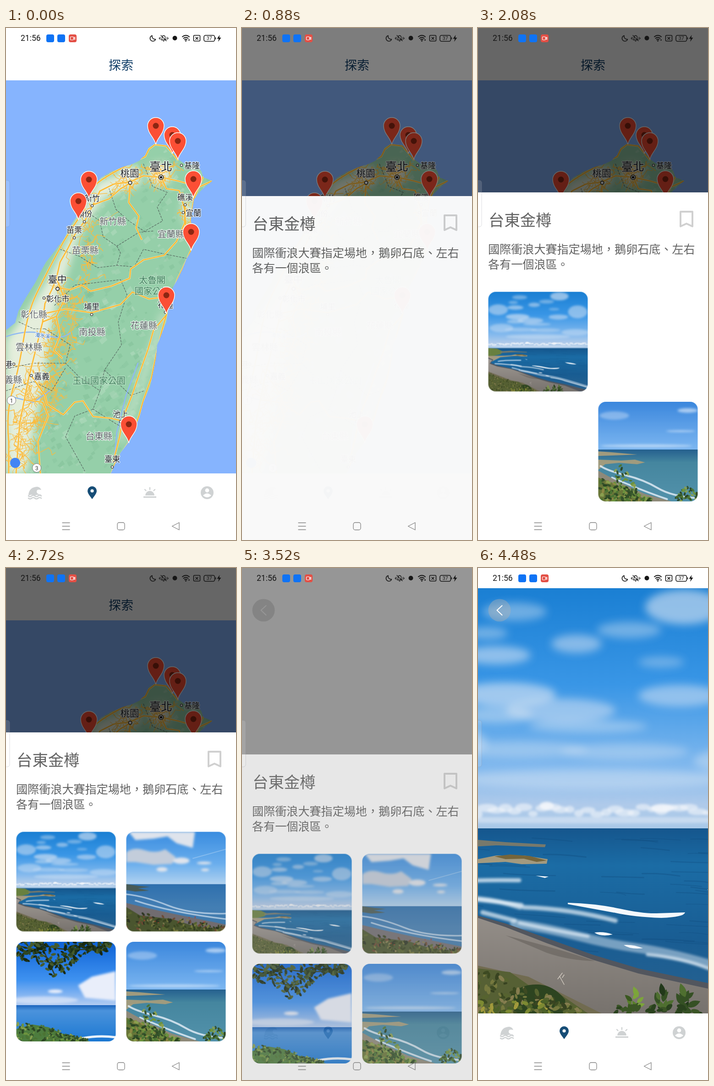
An HTML page for the animation above (4560 ms loop, 502x1115 px).

```html
<!DOCTYPE html>
<html lang="zh-Hant">
<head>
<meta charset="utf-8">
<title>探索</title>
<style>
html, body { margin: 0; width: 100%; height: 100%; overflow: hidden; background: #fff; }
svg { display: block; }
text { font-family: "Noto Sans CJK TC", "Noto Sans CJK", sans-serif; }
.latin { font-family: Roboto, sans-serif; }
.label { text-anchor: middle; paint-order: stroke; stroke: #fffc; stroke-width: 2.6px; stroke-linejoin: round; }
.town { fill: #20242a; font-weight: 500; }
.county { fill: #5c6266; }
.park { fill: #43805f; stroke: #d3ecdb99; }
.line { fill: none; stroke-linecap: round; stroke-linejoin: round; }
.road { stroke: #fbb62e; stroke-width: 2.2; }
.casing { stroke: #fde6a4; stroke-width: 3.6; }
.border { stroke: #52625c; stroke-width: 1.1; stroke-dasharray: 4 3; }
.foam { stroke: #e9f2fa; }

.anim { animation: 4560ms step-end infinite; }
#detail { animation-name: page; }
#hero { animation-name: hero; }
#dim { animation-name: dim; }
#sheet { animation-name: sheet; }
#p1 { animation-name: load1; }
#p2 { animation-name: load2; }
#p3 { animation-name: load3; }
#p4 { animation-name: load4; }
@keyframes page { 0% { opacity: 0 } 75.43%, 100% { opacity: 1 } }
@keyframes hero { 0% { opacity: 0 } 82.45%, 100% { opacity: 1 } }
@keyframes dim {
  0% { opacity: 0 } 15.78% { opacity: .12 } 17.53% { opacity: .34 } 19.29% { opacity: .51 } 21.05% { opacity: .6 }
  75.43% { opacity: .54 } 77.19% { opacity: .41 } 78.94% { opacity: .22 } 80.7% { opacity: .06 } 82.45%, 100% { opacity: 0 }
}
@keyframes sheet {
  0% { opacity: 0; transform: translateY(205px) }
  15.78% { opacity: .5; transform: translateY(102px) }
  17.53% { opacity: .8; transform: translateY(40px) }
  19.29% { opacity: .96; transform: translateY(8px) }
  21.05% { opacity: 1; transform: none }
  75.43% { opacity: .94; transform: translateY(12px) }
  77.19% { opacity: .77; transform: translateY(48px) }
  78.94% { opacity: .43; transform: translateY(117px) }
  80.7% { opacity: .1; transform: translateY(184px) }
  82.45%, 100% { opacity: 0; transform: translateY(205px) }
}
@keyframes load1 { 0% { opacity: 0 } 36.84%, 100% { opacity: 1 } }
@keyframes load4 { 0% { opacity: 0 } 40.35%, 100% { opacity: 1 } }
@keyframes load2 { 0% { opacity: 0 } 49.12% { opacity: .35 } 50.87% { opacity: .7 } 52.63%, 100% { opacity: 1 } }
@keyframes load3 { 0% { opacity: 0 } 59.64%, 100% { opacity: 1 } }
</style>
</head>
<body>
<svg width="502" height="1115" viewBox="0 0 502 1115">
<defs>
  <filter id="soft" x="-50%" y="-50%" width="200%" height="200%"><feGaussianBlur stdDeviation="9"/></filter>
  <filter id="haze" x="-50%" y="-50%" width="200%" height="200%"><feGaussianBlur stdDeviation="2.5"/></filter>
  <path id="coast" d="M0,658 L20,642 27,616 44,586 64,554 78,526 87,510 106,486 126,460 140,432 152,414 166,398 174,382 182,363 192,344 207,326 232,312 252,304 274,297 291,289 304,276 311,260 325,252 350,255 361,268 375,285 390,296 414,298 426,311 431,325 450,333 434,346 420,360 410,373 407,392 403,420 408,440 418,455 412,470 404,486 394,502 385,525 375,545 362,570 358,590 353,620 350,640 340,665 330,690 327,718 322,745 315,780 300,815 292,845 280,875 265,905 250,925 240,945 228,971 0,971Z"/>
  <clipPath id="land"><use href="#coast"/></clipPath>
  <clipPath id="tile"><rect width="217" height="217" rx="16"/></clipPath>
  <g id="pin">
    <path d="M0,0 C-2,-14 -18,-24 -18,-41 a18,18 0 0 1 36,0 C18,-24 2,-14 0,0Z" fill="#fb4f35" stroke="#fff" stroke-width="1.4"/>
    <circle cy="-41" r="6.5" fill="#8b2612"/>
  </g>
  <linearGradient id="sky1" x2="0" y2="1"><stop stop-color="#1a7fd3"/><stop offset=".4" stop-color="#3996e6"/><stop offset=".75" stop-color="#82b9ee"/><stop offset=".9" stop-color="#afcaea"/><stop offset="1" stop-color="#a9c9e8"/></linearGradient>
  <linearGradient id="sea1" x2="0" y2="1"><stop stop-color="#15568d"/><stop offset=".2" stop-color="#1b6ca5"/><stop offset=".6" stop-color="#195d93"/><stop offset="1" stop-color="#2a628f"/></linearGradient>
  <linearGradient id="sand1" x2="0" y2="1"><stop stop-color="#a09a94"/><stop offset="1" stop-color="#77726d"/></linearGradient>
  <linearGradient id="sky2" x2="0" y2="1"><stop stop-color="#3a8de0"/><stop offset=".6" stop-color="#6aaeed"/><stop offset="1" stop-color="#b3d3f0"/></linearGradient>
  <linearGradient id="sea2" x2="0" y2="1"><stop stop-color="#2f70ae"/><stop offset=".5" stop-color="#447fb4"/><stop offset="1" stop-color="#3d76a5"/></linearGradient>
  <linearGradient id="sky3" x2="0" y2="1"><stop stop-color="#0e62d6"/><stop offset=".6" stop-color="#3f92f0"/><stop offset="1" stop-color="#b5cdf2"/></linearGradient>
  <linearGradient id="sea3" x2="0" y2="1"><stop stop-color="#1b64bd"/><stop offset=".15" stop-color="#4b93dc"/><stop offset="1" stop-color="#1c78d2"/></linearGradient>
  <linearGradient id="sky4" x2="0" y2="1"><stop stop-color="#3b87dd"/><stop offset="1" stop-color="#7db7f1"/></linearGradient>
  <linearGradient id="sea4" x2="0" y2="1"><stop stop-color="#25608f"/><stop offset=".25" stop-color="#45869f"/><stop offset="1" stop-color="#5392ab"/></linearGradient>

  <symbol id="bay" viewBox="-212 44 926 926">
    <rect x="-212" y="44" width="926" height="524" fill="url(#sky1)"/>
    <g id="clouds" fill="#dfe8f4" filter="url(#soft)"/>
    <g id="cumulus" fill="#f2f5fa" filter="url(#haze)"/>
    <rect x="-212" y="567" width="926" height="403" fill="url(#sea1)"/>
    <g id="ripples" class="line" stroke="#0f4878"/>
    <path d="M-212,567 L-130,572 -95,590 -70,600 -100,625 -212,650Z" fill="#68803f"/>
    <path d="M-100,598 L0,592 60,597 148,602 146,608 40,604 -100,612Z" fill="#77796c"/>
    <path d="M-212,640 L-60,638 0,634 40,626 100,626 152,634 150,644 95,645 60,640 0,643 -100,652 -175,690 -212,700Z" fill="#a39a7f"/>
    <path d="M36,628 L70,624 112,627 150,637 128,640 100,633 60,634Z" fill="#75653b"/>
    <g class="line foam" filter="url(#haze)">
      <path d="M-120,690 Q-60,678 90,680 M-150,712 Q-40,715 95,734" stroke-width="9" opacity=".75"/>
      <path d="M0,720 Q45,724 92,739 M100,739 Q200,742 300,768 M10,750 L80,768" stroke-width="10" opacity=".7"/>
      <path d="M80,774 Q150,784 220,802 T350,828 T502,862 T714,925" stroke-width="20" opacity=".45"/>
      <path d="M90,773 Q180,792 240,802 M370,842 Q450,850 502,872 L714,932" stroke-width="7" opacity=".7"/>
    </g>
    <path d="M196,729 Q260,731 310,742 T390,752 L452,750 Q450,760 400,762 Q340,760 300,751 Q250,742 196,732Z M126,670 l28,2 -8,3Z M254,794 q20,-3 40,4 q-25,6 -40,-4Z M318,821 q20,-2 42,7 q-28,3 -42,-7Z M500,700 q60,0 110,18 q-60,4 -110,-18Z" fill="#f4f8fc"/>
    <path d="M-212,655 L-165,675 -190,705 -130,728 0,757 60,774 150,806 250,842 350,872 502,904 714,958 714,970 -212,970Z" fill="#52565e"/>
    <path d="M-212,665 L-175,680 -200,712 -130,738 0,762 60,782 150,817 250,853 350,883 502,916 640,970 -212,970Z" fill="url(#sand1)"/>
    <path d="M60,800 Q180,830 255,856 Q200,855 150,838Z" fill="#66615d" opacity=".6"/>
    <path d="M174,895 l10,-13 M178,889 l10,18 M184,892 l4,-6" class="line" stroke="#cfc8be" stroke-width="1.5"/>
    <path d="M-212,785 L-100,828 0,866 110,890 190,930 270,970 -212,970Z" fill="#716b50"/>
    <path d="M-212,800 L-100,845 0,872 70,880 110,908 160,915 240,970 -212,970Z" fill="#566034"/>
    <path d="M72,928 Q95,906 130,907 T190,940 L192,970 H80Z" fill="#2d4420"/>
    <g id="scrub"/>
    <g id="sprigs"/>
  </symbol>
</defs>

<g id="explore">
  <rect width="502" height="1115" fill="#fff"/>
  <text x="251" y="81" dy=".38em" font-size="27" text-anchor="middle" fill="#123f68">探索</text>
  <rect y="114" width="502" height="856" fill="#86b4fe"/>
  <svg width="502" height="970">
  <g clip-path="url(#land)">
    <use href="#coast" fill="#95cfa9"/>
    <g id="relief"/>
    <g filter="url(#soft)">
      <path d="M200,335 Q150,430 110,510 T20,650 L0,680 V970 H45 Q65,850 88,740 Q98,640 120,570 T165,440 L215,370 300,335 270,310Z" fill="#e5eedc"/>
      <circle cx="336" cy="318" r="24" fill="#f3ecd8"/><circle cx="268" cy="325" r="25" fill="#e6eddc"/>
      <ellipse cx="396" cy="400" rx="12" ry="26" fill="#e4ecda"/><path d="M345,620 L300,760 250,900" stroke="#c8e3ca" stroke-width="12"/>
    </g>
    <g id="lanes" class="line" stroke="#fbbb3d"/>
    <path class="line" d="M0,672 Q50,655 85,668 T140,664 M20,805 L60,815 95,790 M288,730 L262,800 242,880 236,940" stroke="#8fb9f3" stroke-width="2.5"/>
    <g class="line border">
      <path d="M300,296 L320,345 352,358 330,390 342,420 302,443 268,420 240,395 225,350"/>
      <path d="M183,405 L205,420 212,455 242,475 290,445 322,442 M118,482 L160,497 200,522 242,517 250,490 242,475"/>
      <path d="M242,517 L280,520 300,482 345,492 396,502 M106,604 L150,560 250,548 264,580 245,640 252,690 215,745 205,790"/>
      <path d="M85,655 L140,690 130,730 160,760 205,790 190,830 240,862 275,880 M0,790 L60,770 100,790 130,740"/>
      <path d="M190,830 L150,845 130,890 172,965 M215,745 L272,800 302,790 M28,640 L60,655 85,655 M0,742 L60,730 130,730"/>
    </g>
    <g id="roads"></g>
  </g>
  <g id="labels"></g>
  <text class="label" x="80" y="670" dy=".38em" font-size="11" fill="#2f6fc4" transform="rotate(6 80 670)">濁水溪</text>
  <g fill="#fff" stroke="#777" class="latin"><circle cx="12" cy="811" r="9.5"/><circle cx="67" cy="958" r="9.5"/></g>
  <g font-size="12" text-anchor="middle" fill="#333"><text class="latin" x="12" y="815.5">1</text><text class="latin" x="67" y="962.5">3</text></g>
  <circle cx="20" cy="947" r="11" fill="#4285f4"/>
  <g id="pins"></g>
  </svg>
  <g id="tabs">
    <g fill="#cfd2d3">
      <path d="M49,1016 Q51,1000 68,999 Q75,1000 77,1006 Q66,1003 67,1011 Q69,1016 77,1016 L76,1018 Q70,1015 63,1018 Q56,1015 49,1018Z"/>
      <path class="line" d="M49,1019 q3.5,3 7,0 t7,0 t7,0 t7,0 M49,1024 q3.5,3 7,0 t7,0 t7,0 t7,0" stroke="#cfd2d3" stroke-width="2.6" style="fill:none"/>
      <path d="M304,1018 a10,10 0 0 1 20,0Z M300,1020 h28 v3 h-28Z"/>
      <path class="line" d="M314,1001 v4 M303,1005 l2.5,2.5 M325,1005 l-2.5,2.5" stroke="#cfd2d3" stroke-width="2.4"/>
      <circle cx="439" cy="1012" r="14"/>
    </g>
    <circle cx="439" cy="1007" r="4.4" fill="#fff"/><path d="M430,1018 q9,-9 18,0 q-9,8 -18,0Z" fill="#fff"/>
    <path d="M188,1026 C184,1020 178,1014 178,1008 a10,10 0 0 1 20,0 C198,1014 192,1020 188,1026Z" fill="#164d76"/><circle cx="188" cy="1008" r="3.6" fill="#fff"/>
  </g>
</g>

<g id="detail" class="anim">
  <rect width="502" height="1115" fill="#fff"/>
  <g id="hero" class="anim"><use href="#bay" x="-212" y="44" width="926" height="926"/></g>
  <circle cx="47" cy="92" r="24.5" fill="#b2b2b2" opacity=".4"/>
  <path class="line" d="M52.5,82 L41.5,92 52.5,102.5" stroke="#fff" stroke-width="2"/>
  <use href="#tabs"/>
</g>

<rect id="dim" class="anim" width="502" height="1115"/>

<g id="sheet" class="anim">
  <rect y="358" width="502" height="760" fill="#fff"/>
  <g fill="#626262">
    <text x="23" y="418" dy=".38em" font-size="34.4">台東金樽</text>
    <g font-size="25.1"><text x="22" y="481" dy=".38em">國際衝浪大賽指定場地，鵝卵石底、左右</text><text x="22" y="514" dy=".38em">各有一個浪區。</text></g>
  </g>
  <path d="M442,400 h26 v32 l-13,-6 -13,6Z" fill="none" stroke="#d0d0d0" stroke-width="4" stroke-linejoin="round"/>
  <g transform="translate(22.5 574.5)"><g id="p1" class="anim" clip-path="url(#tile)"><use href="#bay" width="217" height="217"/></g></g>
  <g transform="translate(262.5 574.5)"><g id="p2" class="anim" clip-path="url(#tile)">
    <rect width="217" height="115" fill="url(#sky2)"/>
    <g filter="url(#haze)" fill="#dfe4ec">
      <path d="M5,0 H150 L145,35 110,25 90,10 60,15 20,18Z"/><path d="M0,45 Q15,32 40,40 T85,38 L108,55 100,70 60,72 20,66 0,66Z" fill="#c3cddb"/>
      <ellipse cx="120" cy="63" rx="18" ry="7"/><ellipse cx="78" cy="82" rx="12" ry="5"/><ellipse cx="170" cy="68" rx="16" ry="3"/><ellipse cx="172" cy="83" rx="9" ry="3"/>
    </g>
    <path class="line" d="M145,58 L217,38" stroke="#e6f0fa" opacity=".6"/>
    <rect y="114" width="217" height="103" fill="url(#sea2)"/>
    <path d="M0,114 L28,118 52,120 25,123 50,128 20,130 0,127Z" fill="#485a55"/>
    <path class="line foam" d="M0,136 Q40,140 90,160 T217,178 M20,150 Q100,176 217,190" stroke-width="3" opacity=".65"/>
    <path d="M0,155 L50,167 110,180 217,202 V217 H0Z" fill="#716c70"/>
    <path d="M0,164 L30,182 100,190 150,206 217,212 V217 H0Z" fill="#4a552f"/>
    <g id="brush2"/>
  </g></g>
  <g transform="translate(22.5 814)"><g id="p3" class="anim" clip-path="url(#tile)">
    <rect width="217" height="139" fill="url(#sky3)"/>
    <g filter="url(#haze)" fill="#e9eefa"><path d="M135,95 L165,76 217,64 V128 L150,122Z"/><ellipse cx="85" cy="108" rx="16" ry="4"/><ellipse cx="60" cy="127" rx="75" ry="8" opacity=".6"/></g>
    <rect y="138" width="217" height="79" fill="url(#sea3)"/>
    <path class="line foam" d="M145,210 Q180,203 217,208" stroke-width="5"/>
    <path class="line" d="M0,8 Q60,18 100,65 M40,0 Q110,30 205,8 M60,20 L85,75" stroke="#2e3a22" stroke-width="2.5"/>
    <path d="M0,217 V190 L35,180 70,186 100,200 150,212 160,217Z" fill="#4d7c3e"/>
    <g id="canopy"/><g id="brush3"/>
  </g></g>
  <g transform="translate(262.5 814)"><g id="p4" class="anim" clip-path="url(#tile)">
    <rect width="217" height="105" fill="url(#sky4)"/>
    <g filter="url(#haze)" fill="#dceafa" opacity=".65"><ellipse cx="35" cy="30" rx="32" ry="9" opacity=".6"/><ellipse cx="195" cy="19" rx="22" ry="5"/><ellipse cx="180" cy="64" rx="32" ry="2"/><ellipse cx="105" cy="96" rx="100" ry="3"/></g>
    <rect y="104" width="217" height="113" fill="url(#sea4)"/>
    <path d="M0,108 L30,110 85,115 30,117 0,118Z M0,126 L50,128 80,126 102,132 85,136 45,133 15,136 0,148Z" fill="#a09b7e"/>
    <path class="line foam" d="M5,140 Q20,150 60,160 T130,188 T217,210 M30,165 Q100,195 150,212" stroke-width="4" opacity=".8"/>
    <path d="M0,150 L40,172 100,200 160,217 H0Z" fill="#8e8979"/>
    <path d="M0,165 L30,176 70,195 110,217 H0Z" fill="#687638"/>
    <g id="brush4"/>
  </g></g>
</g>

<g id="system">
  <text class="latin" x="32" y="28.2" font-size="17.5" fill="#161616">21:56</text>
  <rect x="88" y="14" width="17" height="17" rx="4" fill="#0f73f5"/><rect x="112" y="14" width="17" height="17" rx="4" fill="#0f73f5"/><rect x="137" y="14" width="17" height="17" rx="4" fill="#e34f45"/>
  <g class="line" stroke="#fff" stroke-width="1.2"><rect x="140.500" y="19" width="7" height="7" rx="1.500"/><path d="M147.500,22 l3,-2 v5 l-3,-2"/></g>
  <g class="line" stroke="#161616" stroke-width="1.6">
    <path d="M319,16.500 a6.200,6.200 0 1 0 7.500,8 a6.500,6.500 0 0 1 -7.500,-8Z"/>
    <path d="M339,26 h10 l-1.500,-3 v-3 a3.500,3.500 0 0 0 -7,0 v3Z M343,28.500 h2 M338,16 l12,12 M336.500,20 v5 M334.500,21.500 v2 M351.500,20 v5 M354,21.500 v2" stroke-width="1.3"/>
    <path d="M385,19 q7.500,-6 15,0 M387.500,22.500 q5,-4 10,0 M390,25.500 q2.500,-2 5,0" stroke-width="2"/>
    <rect x="409.500" y="16" width="14" height="12.500" rx="2"/><path d="M414,20 l5,5 m0,-5 l-5,5"/>
    <rect x="432" y="16" width="23.500" height="13" rx="3.500"/><path d="M457.500,21 v3"/>
  </g>
  <circle cx="368.500" cy="22" r="5" fill="#161616"/><circle cx="392.500" cy="28" r="1.500" fill="#161616"/>
  <circle cx="399.500" cy="26" r="1.500" fill="#161616"/>
  <text class="latin" x="443.700" y="26.300" font-size="10.500" text-anchor="middle" fill="#161616">37</text>
  <path d="M466.500,15 l-6,8.500 h4 l-1.500,6.500 6.500,-9 h-4Z" fill="#161616"/>
  <g class="line" stroke="#858585" stroke-width="1.3">
    <path d="M123,1077.500 h16 M123,1085 h16 M123,1092.500 h16 M362.500,1085 L378,1077 V1093Z"/><rect x="243" y="1077" width="16" height="16" rx="4"/>
  </g>
  <rect x="-10" y="332" width="18" height="101" rx="5" fill="#fff" fill-opacity=".14" stroke="#8a8f98" stroke-opacity=".3"/>
</g>
</svg>

<script>
let seed = 7;
const rnd = (a = 0, b = 1) => {
  seed = (seed * 16807) % 2147483647;
  return a + (b - a) * seed / 2147483647;
};
const pick = list => list[Math.floor(rnd(0, list.length))];
const put = (id, html) => document.getElementById(id).insertAdjacentHTML('beforeend', html);
const many = (n, make) => Array.from({ length: n }, (_, i) => make(i)).join('');
const f = v => v.toFixed(1);

// Map relief: small shaded facets over the mountains
put('relief', many(420, () => {
  const y = rnd(270, 970), mid = 350 - (y - 270) * .27, x = mid + rnd(-130, 120), s = rnd(4, 13);
  return `<path d="M${f(x)},${f(y)} l${f(s)},${f(-s * rnd(.3, 1.2))} ${f(s * .5)},${f(s * .8)} ${f(-s)},${f(s * rnd(.3, .9))}Z" fill="${pick(['#b3dcbf', '#a8d6b6', '#84c19a', '#8ac7a0'])}" opacity=".55"/>`;
}));

// Minor roads: short grid-like walks
const walk = (x, y, steps, size) => {
  let d = `M${f(x)},${f(y)}`, angle = rnd(0, 6.3);
  for (let i = 0; i < steps; i++) {
    const a = angle + pick([0, 0, 1.4, -1.4]) + rnd(-.35, .35);
    d += ` l${f(Math.cos(a) * size)},${f(Math.sin(a) * size)}`;
  }
  return `<path d="${d}" stroke-width="${f(rnd(.7, 1.5))}"/>`;
};
put('lanes', many(190, () => {
  const t = Math.sqrt(rnd());
  return walk(215 - 180 * t + rnd(-28, 28) * (.5 + t), 345 + 600 * t, 7, 9);
}) + many(34, () => walk(338 + rnd(-22, 22), 316 + rnd(-18, 18), 6, 6))
   + many(24, () => walk(262 + rnd(-40, 35), 325 + rnd(-16, 18), 6, 8))
   + many(10, () => walk(396 + rnd(-8, 8), 402 + rnd(-24, 24), 5, 7)));

const roads = [
  'M450,333 L424,345 400,340 375,333 339,325 300,322 271,335 235,340 205,355 190,385 172,420 150,450 135,480 118,510 110,545 100,570 85,600 80,640 70,680 60,720 50,760 40,810 30,860 22,970',
  'M375,287 L361,270 350,257 325,254 312,264 304,280 Q250,304 210,330 T172,397 Q140,437 112,490 T66,580 T38,680 T14,790 T6,900 V970',
  'M430,325 L410,372 403,420 413,455 404,483 385,525 375,545 358,590 350,625 340,660 328,710 318,760 300,810 290,845 268,902 240,943 230,970',
  'M350,625 L322,658 310,700 292,750 275,800 255,850 248,890 234,945',
  'M110,565 L140,570 165,560 185,573 230,562 270,545 272,525 300,505 345,495 372,465 390,425 391,385',
  'M83,622 L130,612 187,620 250,602 276,575 312,590 352,585',
  'M55,757 L85,800 90,820 125,842 150,815 168,812 190,846 230,850 250,855',
  'M339,325 L350,350 378,354 390,395 392,430 405,450',
  'M190,385 L225,372 250,350 271,338 268,380 290,410 284,435 296,460',
  'M80,640 L110,628 118,670 105,702 122,718 M40,810 L80,815 92,845 70,900 75,970 M110,545 L128,590 110,628'
];
for (const c of ['casing', 'road']) put('roads', roads.map(d => `<path class="line ${c}" d="${d}"/>`).join(''));

const label = (cls, size) => ([s, x, y]) =>
  `<text class="label ${cls}" x="${x}" y="${y}" dy=".38em" font-size="${size}">${s}</text>`;
const dot = ([x, y]) => `<circle cx="${x}" cy="${y}" r="2.6" fill="#fff" stroke="#444" stroke-width="1.3"/>`;
put('labels', [[383, 299], [188, 387], [171, 422], [391, 385], [387, 402], [149, 457], [83, 588], [187, 624], [348, 619], [17, 732], [55, 757], [250, 857], [232, 956]].map(dot).join('')
  + '<g fill="#fff" stroke="#222" stroke-width="1.6"><circle cx="271" cy="337" r="3.6"/><circle cx="112.500" cy="568" r="3.600"/><circle cx="338.500" cy="325" r="5"/></g><circle cx="338.500" cy="325" r="2.600"/>'
  + [['新竹縣', 233, 421], ['宜蘭縣', 360, 449], ['苗栗縣', 173, 484], ['彰化縣', 61, 624], ['花蓮縣', 301, 648], ['南投縣', 188, 662], ['雲林縣', 50, 695], ['嘉義縣', 6, 766], ['台東縣', 203, 889]].map(label('county', 19.5)).join('')
  + [['太魯閣', 319, 549], ['國家公園', 319, 573], ['玉山國家公園', 203, 768]].map(label('park', 19.3)).join('')
  + [['基隆', 406, 300], ['新竹', 188, 371], ['頭份', 171, 405], ['礁溪', 391, 369], ['宜蘭', 409, 403], ['苗栗', 149, 440], ['彰化市', 113, 590], ['埔里', 187, 607], ['花蓮', 348, 603], ['港', 5, 733], ['嘉義', 78, 759], ['池上', 250, 841], ['臺東', 232, 939]].map(label('town', 17)).join('')
  + [['桃園', 270, 316], ['臺中', 112, 547]].map(label('town', 20.5)).join('') + label('town', 25)(['臺北', 338, 301]));

put('pins', [[327, 254], [363, 274], [375, 287], [181, 371], [409, 370], [158, 418], [404, 485], [350, 623], [268, 904]]
  .map(([x, y]) => `<use href="#pin" x="${x}" y="${y}"/>`).join(''));

// Photos
const puff = ([x, y, rx, ry, o]) => `<ellipse cx="${x}" cy="${y}" rx="${rx}" ry="${ry}" opacity="${o}"/>`;
put('clouds', [[80, 95, 70, 20, .4], [20, 142, 45, 14, .4], [450, 85, 85, 38, .6], [330, 135, 70, 18, .4], [215, 165, 55, 20, .5],
  [40, 190, 75, 20, .55], [400, 205, 50, 12, .35], [60, 275, 110, 26, .6], [180, 310, 120, 26, .5], [440, 278, 90, 24, .5],
  [40, 320, 80, 18, .45], [240, 345, 130, 14, .4], [90, 395, 150, 18, .35], [320, 400, 140, 18, .35], [250, 460, 300, 22, .4],
  [-120, 210, 90, 50, .5], [-90, 380, 110, 40, .4], [620, 230, 90, 60, .5], [600, 420, 130, 30, .4]].map(puff).join(''));
put('cumulus', many(46, i => puff([f(-200 + i * 20), f(529 + rnd(-9, 9)), f(rnd(10, 24)), f(rnd(4, 10)), .6]))
  + puff([150, 518, 16, 9, .9]) + puff([402, 523, 25, 9, .9]) + puff([250, 549, 460, 7, .4]));
put('ripples', many(60, () => {
  const y = rnd(585, 830), x = rnd(-100, 690);
  return `<path d="M${f(x)},${f(y)} q${f(rnd(20, 60))},${f(rnd(-2, 4))} ${f(rnd(50, 120))},${f(rnd(2, 8))}" stroke-width="${f(rnd(1, 3))}" opacity=".3"/>`;
}));

const foliage = (n, x0, x1, top, bottom, colors, size) => many(n, () => {
  const x = rnd(x0, x1), y = rnd(top(x), bottom(x)), r = rnd(size * .5, size);
  return `<ellipse cx="${f(x)}" cy="${f(y)}" rx="${f(r)}" ry="${f(r * .5)}" fill="${pick(colors)}" transform="rotate(${f(rnd(0, 180))} ${f(x)} ${f(y)})"/>`;
});
const olive = ['#3d4a22', '#56632f', '#75783e', '#857d4f', '#384321'];
const green = ['#33502a', '#4c7434', '#6d943f', '#8aa050', '#2b4523'];
put('scrub', foliage(230, -212, 225, x => 872 + x * .4, () => 970, olive, 9)
  + foliage(36, 0, 160, () => 942, () => 970, ['#a29a3c', '#7d8a32', '#4c6128'], 9));
const leaf = (x, y, a, s, c) => `<path d="M0,0 Q10,-13 27,0 Q10,11 0,0Z" fill="${c}" transform="translate(${x} ${y}) rotate(${a}) scale(${s})"/>`;
put('sprigs', [[340, 968, 1.1], [405, 966, 1.1], [458, 968, 1.3]].map(([x, y, s], i) =>
  many(9, k => leaf(x + rnd(-10, 10), y - k * 4.2, k % 2 ? rnd(-80, -10) : rnd(-170, -100), s * rnd(.6, 1), pick(i < 1 ? ['#7ca53a', '#587f2a', '#39581f'] : ['#355024', '#4f6f30', '#22381a'])))).join('')
  + foliage(30, 300, 490, () => 954, () => 974, ['#2a421e', '#3b5526'], 10));
put('brush2', foliage(150, 0, 217, x => 172 + x * .15, () => 217, [...olive, '#6b4a33', '#2d3523'], 5)
  + foliage(7, 35, 175, () => 182, () => 200, ['#b0402f'], 2.5));
put('canopy', foliage(210, 0, 208, () => 0, x => 24 + 52 * Math.exp(-(((x - 88) / 42) ** 2)) + 18 * Math.exp(-(((x - 10) / 25) ** 2)), ['#1e3218', '#2f4722', '#455b2d', '#16260f'], 7));
put('brush3', foliage(150, 0, 155, x => 178 + Math.max(0, x - 45) * .32, () => 217, green, 5));
put('brush4', foliage(140, 0, 115, x => 163 + x * .42, () => 217, [...green, '#8f8845'], 6)
  + foliage(50, 35, 90, x => 135 + Math.abs(x - 48) * 1.3, () => 212, green, 5)
  + foliage(45, 170, 217, x => 182 + Math.abs(x - 196) * .9, () => 217, green, 5));
</script>
</body>
</html>
```
